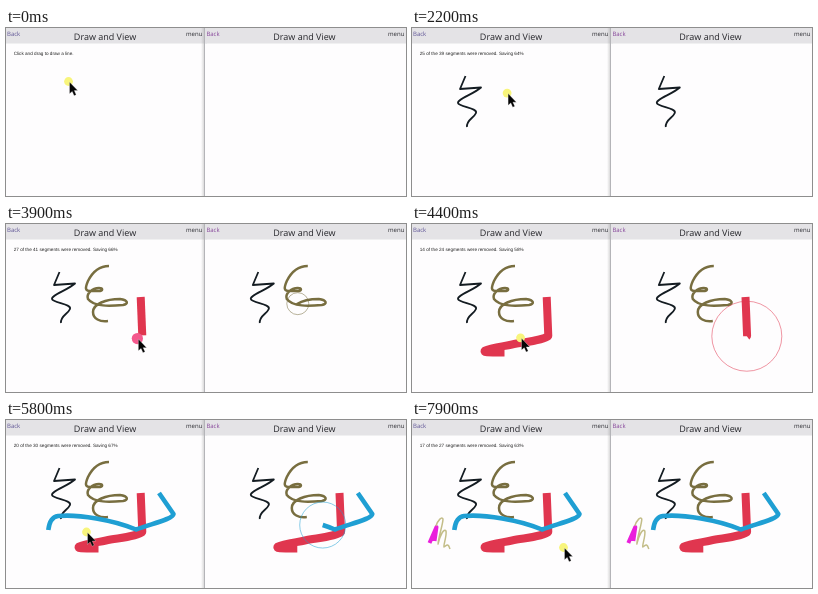
Recreate the animation shown at these times as an HTML page. Size 400 by 168 pixels, loop 8 s.

```html
<!DOCTYPE html>
<html lang="en">
<head>
<meta charset="utf-8">
<title>Draw and View</title>
<style>
  html, body { margin: 0; width: 100%; height: 100%; overflow: hidden; background: #fefdfe; }
  svg { display: block; width: 400px; height: 168px; }
  text { font-family: "Open Sans", "Noto Sans", sans-serif; text-rendering: geometricPrecision; }
  .bar { fill: #e4e3e6; }
  .title { font-size: 9px; text-anchor: middle; fill: #25252a; }
  .back { font-size: 6px; }
  .menu { font-size: 6px; fill: #2a2a30; }
  #note { font: 4.65px "Liberation Sans", Arial, sans-serif; fill: #222; }
  .ink path { fill: none; stroke-linejoin: round; }
  #ring { fill: none; stroke-width: .7; stroke-opacity: .75; }
</style>
</head>
<body>
<svg viewBox="0 0 400 168">
  <defs>
    <linearGradient id="shade">
      <stop offset="0" stop-color="#888" stop-opacity="0"/>
      <stop offset="1" stop-color="#888" stop-opacity=".3"/>
    </linearGradient>
    <g id="header">
      <rect class="bar" width="201" height="15.5"/>
      <text class="back" x="1" y="8.2">Back</text>
      <text class="title" x="99" y="12">Draw and View</text>
    </g>
  </defs>
  <rect width="400" height="168" fill="#fefdfe"/>
  <use href="#header" fill="#5f5596"/>
  <use href="#header" x="199.4" fill="#86459a"/>
  <text class="menu" x="180" y="8.2">menu</text>
  <text class="menu" x="382" y="8.2">menu</text>
  <rect x="195" width="3" height="168" fill="url(#shade)"/>
  <rect x="198" width="1" height="168" fill="#b4b4b8"/>
  <text id="note" x="7.7" y="27"></text>
  <g id="left" class="ink"></g>
  <g id="right" class="ink" transform="translate(198.8 0)"><circle id="ring"/></g>
  <g id="pointer">
    <circle id="dot"/>
    <path d="M1 .5V12.3L3.7 9.9L5.6 14.2L7.7 13.2L5.8 9.1H9.3Z" fill="#050505" stroke="#fff" stroke-width=".3"/>
  </g>
</svg>
<script>
const LOOP = 8000, STEP = 100, LAG = 20;
const YELLOW = '#f8f57c', PINK = '#f4588c';
const $ = id => document.getElementById(id);

// draw / view: [start, duration]; count: [removed, total]
const strokes = [
  { color: '#141c22', width: 1.8, ring: 5, dot: PINK, draw: [300, 600], view: [1790, 270], count: [25, 39],
    d: 'M53.5 48L48 61L69 59.5C62 66 45 71 46 75C47 79 66 80 64 85C62 90 54 92 55 99' },
  { color: '#786e40', width: 2.5, ring: 11, dot: YELLOW, draw: [2600, 750], view: [3590, 375], count: [27, 41],
    d: 'M103 42C92 42 86 49 82 57C79 64 79 67 84 67L94 67C97 66 97 64 93 64C86 64 80 70 82 75C88 83 104 82 117 81C123 80 122 76 114 75C100 75 87 80 87 88C87 95 94 98 102 97' },
  { color: '#e0364f', width: 8, ring: 35, dot: PINK, draw: [3758, 400], view: [4295, 335], count: [14, 24],
    d: 'M134.7 73L136.3 112C130 117 112 118 100 120.5C90 122.5 78 124 73 126.5C71 128.5 74 128.5 92.5 128.5' },
  { color: '#1f9fd3', width: 4.6, ring: 23, dot: PINK, draw: [4875, 525], view: [5590, 435], count: [20, 30],
    d: 'M153 73L167.5 94C167 99 148 103 130 109.5C108 100 72 94 52 96C45 97 43 104 42.3 110' },
  { color: '#ea1fdc', width: 4, ring: 26, dot: PINK, draw: [6100, 200], view: [6600, 150], count: [10, 16],
    d: 'M17.5 123L24.5 107L22.5 121' },
  { color: '#c3bd88', width: 1.5, ring: 6, dot: PINK, draw: [6500, 300], view: [7110, 250], count: [17, 27],
    d: 'M24 106C26 100 30 96 31 99C31 104 27 115 26 124C28 115 32 108 34 111C35 116 31 126 32 127C35 125 36 123 38 129' }
];

const rests = [[0, 62.5, 53.5], [1300, 87, 82], [1900, 90, 80], [3530, 114, 111],
  [5800, 80.5, 112], [7250, 98, 117], [7550, 128, 132], [7900, 151.5, 127.5], [8000, 152, 128]];

function addPath(parent, s) {
  const p = document.createElementNS('http://www.w3.org/2000/svg', 'path');
  p.setAttribute('d', s.d);
  p.setAttribute('stroke', s.color);
  p.setAttribute('stroke-width', s.width);
  parent.insertBefore(p, parent.querySelector('circle'));
  return p;
}

for (const s of strokes) {
  s.left = addPath($('left'), s);
  s.right = addPath($('right'), s);
  s.length = s.left.getTotalLength();
}

const part = (t, [start, time]) => Math.min(1, Math.max(0, (t - start) / time));
const active = (t, [start, time]) => t >= start && t < start + time;
const pointOn = (s, f) => s.left.getPointAtLength(s.length * f);

function reveal(path, s, f) {
  path.style.visibility = f > 0 ? 'visible' : 'hidden';
  path.style.strokeDasharray = f < 1 ? `${s.length * f} ${s.length * 2}` : 'none';
}

// Idle pointer positions, including where each stroke begins and ends
const stops = rests.concat(...strokes.map(s => [0, 1].map(f => {
  const p = pointOn(s, f);
  return [s.draw[0] + f * s.draw[1], p.x, p.y];
}))).sort((a, b) => a[0] - b[0]);

function idleAt(t) {
  const i = Math.max(1, stops.findIndex(k => k[0] > t));
  const [t0, x0, y0] = stops[i - 1], [t1, x1, y1] = stops[i];
  const f = (t - t0) / (t1 - t0), e = f * f * (3 - 2 * f);
  return { x: x0 + (x1 - x0) * e, y: y0 + (y1 - y0) * e };
}

function setCircle(el, x, y, r) {
  el.setAttribute('cx', x);
  el.setAttribute('cy', y);
  el.setAttribute('r', r);
}

function render(t) {
  let note = 'Click and drag to draw a line.';
  for (const s of strokes) {
    const end = s.draw[0] + s.draw[1];
    reveal(s.left, s, t >= end ? 1 : part(t - LAG, s.draw));
    reveal(s.right, s, part(t, s.view));
    if (t > end) {
      const [cut, all] = s.count;
      note = `${cut} of the ${all} segments were removed. Saving ${Math.round(cut / all * 100)}%`;
    }
  }
  $('note').textContent = note;

  const pen = strokes.find(s => active(t, s.draw));
  const at = pen ? pointOn(pen, part(t, pen.draw)) : idleAt(t);
  const color = pen ? pen.dot : YELLOW;
  $('pointer').setAttribute('transform', `translate(${at.x} ${at.y})`);
  setCircle($('dot'), 0, 0, color === PINK ? 5.6 : 4.4);
  $('dot').setAttribute('fill', color);

  const seen = strokes.find(s => active(t, s.view));
  $('ring').style.visibility = seen ? 'visible' : 'hidden';
  if (seen) {
    const p = pointOn(seen, part(t, seen.view));
    setCircle($('ring'), p.x, p.y, seen.ring);
    $('ring').setAttribute('stroke', seen.color);
  }
}

const began = performance.now();
function tick() {
  const t = (performance.now() - began) % LOOP;
  render(Math.floor(t / STEP) * STEP);
  requestAnimationFrame(tick);
}
tick();
</script>
</body>
</html>
```
